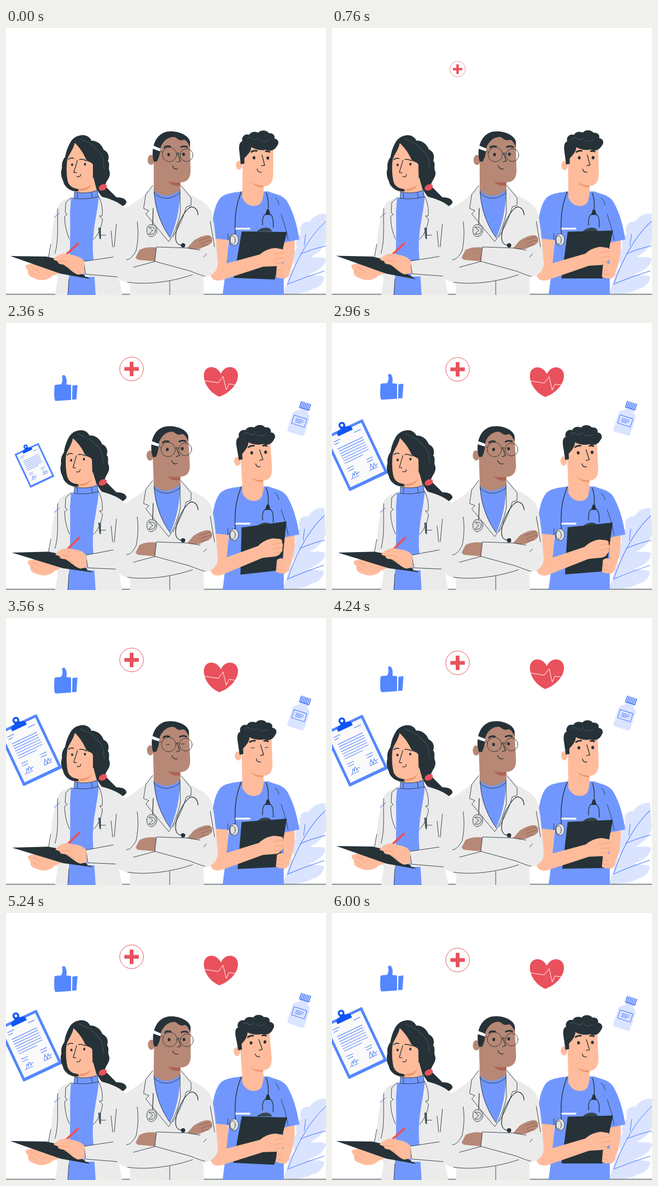
These frames come from a looping animation (600 px wide and 500 px high, 6040 ms). An HTML page:

```html
<!DOCTYPE html>
<html lang="en">
<head>
<meta charset="utf-8">
<title>Medical team</title>
<style>
html, body { margin: 0; width: 100%; height: 100%; overflow: hidden; background: #fff; }
svg { display: block; width: 600px; height: 500px; }
.ink { fill: #263238; }
.line { fill: none; stroke: #263238; stroke-width: .9; stroke-linejoin: round; stroke-linecap: round; }
.bold { stroke-width: 1.6; }
.brow { stroke-width: 3; }
.coat { fill: #ebebeb; }
.scrub { fill: #7197ff; }
.skin { fill: #ffbc9c; }
.brown { fill: #b78876; }
.red { fill: #e9515c; }
.blue { fill: #5387ff; }
.pale { fill: #dbe4ff; }
.thin { fill: none; stroke: #3f73ff; stroke-width: 1; }
.shade { fill: #ee9871; }
</style>
</head>
<body>
<svg viewBox="0 0 600 500">
  <path class="line" style="stroke-width:1.2" d="M0 498.500H600"/>

  <g id="leaf">
    <path class="pale" d="M600 348C584 346 574 355 569 363C554 361 549 374 553 386C545 390 542 402 545 412C537 420 538 440 541 447C529 456 530 470 526 478L520 497C540 499 560 498 574 489C586 487 596 478 597 466C585 462 571 463 567 461C583 456 598 447 600 433C592 426 578 432 572 428C586 422 598 410 602 395Z"/>
    <path class="thin" d="M528 481C542 440 567 391 600 362M552 423Q576 413 600 408M530 479Q562 466 597 455M559 408L562 386"/>
  </g>

  <g id="clip">
    <g transform="translate(45 247.500) rotate(-25.300)">
      <rect class="blue" x="-40" y="-56" width="80" height="112" rx="2"/>
      <rect x="-35" y="-51" width="70" height="101" fill="#fafafa"/>
      <path fill="#0f55f5" d="M-15-46V-52Q-12-56-6-56L-4-60H4L6-56Q12-56 15-52V-46Z"/>
      <circle cy="-62" r="4.500" fill="#fff" stroke="#0f55f5" stroke-width="3.600"/>
      <path class="thin" id="notes"/>
    </g>
  </g>

  <g id="cross">
    <circle r="22.200" fill="#fff" stroke="#e9515c"/>
    <path class="red" d="M-3.500-13.500H3.500V-3.500H13.500V3.500H3.500V13.500H-3.500V3.500H-13.500V-3.500H-3.500Z"/>
  </g>

  <g id="heart">
    <path class="red" d="M-3 28C-18 22-32 6-32-12C-32-30-10-34 0-15C7-32 28-31 31.500-16C35 2 17 21-3 28Z"/>
    <path fill="none" stroke="#fff" stroke-width="1" d="M-31-2L-5 2L4-10L10 15L15 4L30 6"/>
  </g>

  <g id="thumb" class="blue">
    <path d="M-21-5Q-20-7-9-7C-5-12-6-18-7-23Q-2-27 0-21Q3-14 1-7L10-6V22Q-5 23-19 24Q-23 22-21-5Z"/>
    <path d="M12.500-5L22-6L20 21L12 21.500Z"/>
  </g>

  <g id="bottle">
    <g transform="rotate(18)">
      <path class="pale" d="M-6-20H10V-14Q17-12 17-4V26Q17 30 13 30H-12Q-16 30-16 26V-5Q-15-12-6-14Z"/>
      <path fill="none" stroke="#2f66ff" stroke-width="1.600" d="M-7-32V-21M-4-32V-21M-1-32V-21M2-32V-21M5-32V-21M8-32V-21M11-32V-21M-8-20H12"/>
      <path class="thin" d="M-12-3H13V13H-12ZM-7 2H8M-7 5H8M-7 8H4"/>
    </g>
  </g>

  <!-- woman -->
  <path class="ink" d="M171 303C178 316 186 325 200 329Q205 333 208 334Q220 337 226 327Q225 317 207 317Q196 306 186 296Z"/>
  <path class="coat" d="M122 317C108 322 100 326 97 336C88 360 85 390 84 412L79 432L90 452L97 468L92 500H218L204 430L230 400V345C215 325 195 320 173 314Z"/>
  <path class="scrub" d="M122 318L174 315C172 345 161 380 163 420L168 500H116C120 450 121 380 120 345Z"/>
  <path class="skin" d="M134 290L168 286L170 308Q150 316 131 309Z"/>
  <path class="scrub" d="M129 307Q150 312 171 304L173 316Q150 322 128 319Z"/>
  <path class="line" d="M129 307Q150 312 171 304L173 316Q150 322 128 319ZM134 309V318M160 308L162 318M122 318L112 327L111 346L115 349L110 353C110 370 114 384 119 395M173 315C180 325 182 344 180 352L175 352L181 358C179 376 171 389 164 396M97 338C96 375 99 395 92 422M84 405L79 432M200 410L197 380M116 500L118 470"/>
  <path class="thin" d="M90 355L101 346"/>
  <path fill="#455a64" d="M173 374H178V396L175 394Z"/>
  <path class="line" d="M176 388H187"/>

  <g id="womanHead">
    <path class="ink" d="M140 201C150 199 158 205 160 211C172 211 180 219 183 228C190 231 195 239 191 249C196 255 191 262 194 268C197 278 190 284 187 291C184 300 176 305 168 303L130 306C116 304 108 294 107 286C102 276 103 268 105 262C104 255 106 247 111 241C113 230 116 222 122 212C127 205 133 202 140 201Z"/>
    <path class="skin" d="M135 293L164 280L170 303Q152 309 136 305Z"/>
    <path class="shade" d="M130 299Q150 304 160 293Q157 304 141 305Z"/>
    <path class="skin" d="M129 215C126 228 118 236 115 246C113 258 113 276 116 288C119 297 128 302 140 301C154 300 162 290 163 278V256C160 250 154 252 150 246C146 236 140 226 129 215Z"/>
    <path fill="none" stroke="#455a64" d="M139 207C147 213 158 214 164 221C169 229 177 231 180 240C185 247 181 255 185 264"/>
    <path class="line bold" d="M117 246Q121 242 127 244M138 246Q145 245 151 249"/>
    <path class="line" style="stroke-width:1.300" d="M134 248L127 270L132 271M133 278Q140 280 140 274"/>
    <ellipse class="ink" cx="124" cy="256" rx="2" ry="2.500"/>
    <ellipse class="ink" cx="148" cy="255" rx="2" ry="2.500"/>
  </g>
  <ellipse class="red" cx="181.500" cy="298.500" rx="8" ry="5.500" transform="rotate(-25 181.500 298.500)"/>

  <g id="tablet">
    <path class="skin" d="M37 444C36 450 40 452 42 455C39 461 45 467 52 468C60 474 78 474 87 464L98 460L97 448L60 438Z"/>
    <path class="line" style="stroke:#eb996e" d="M42 455Q50 457 54 463M47 447Q58 452 61 458"/>
    <path class="ink" d="M8 427L76 428L97 433L158 470L102 460Z"/>
  </g>
  <g id="womanArm">
    <path class="coat" d="M146 437L205 428L214 466H148Z"/>
    <path class="line" d="M204 428.500L146 437L149 461L214 466.500"/>
    <path stroke="#e9515c" stroke-width="4" stroke-linecap="round" d="M135 404L113 424"/>
    <path class="skin" d="M89 434C95 425 107 420 118 424Q133 426 141 431L147 437V460L135 462C125 459 118 449 107 443Q96 442 97 437Z"/>
    <path class="line" style="stroke:#eb996e" d="M97 437Q108 434 117 439M108 443Q119 446 124 453"/>
  </g>

  <!-- nurse -->
  <path class="skin" d="M392 390H417L416 450L400 472C385 472 380 463 384 450Z"/>
  <path class="skin" d="M519 398L541 395C543 420 538 445 531 458C530 467 524 471 515 470L506 467L507 445L519 438Z"/>
  <path class="scrub" d="M443 306C428 308 412 309 402 318C392 330 388 350 386 372L388 394L418 397C414 440 410 470 406 500H521L520 402L550 396C545 365 538 345 530 330C522 312 505 312 492 306Z"/>
  <path class="skin" d="M443 303V318C450 332 460 334 467 333C477 332 482 327 483 305Z"/>
  <path class="line" d="M416 397L416 385M505 318Q511 324 512 331M516 349C520 362 525 375 529 397M520 402L524 382"/>
  <path class="line" style="stroke-width:1.400" d="M441 307C432 330 428 350 430 386M488 309C493 322 492 335 491 347M481 369C480 351 485 348 491 348C498 348 502 353 501 373"/>
  <path class="ink" d="M489 340H493L496 350H486Z"/>
  <ellipse cx="427.500" cy="396.500" rx="8.500" ry="11" fill="#e0e0e0" stroke="#263238" stroke-width=".9"/>
  <ellipse class="line" cx="425" cy="397" rx="5" ry="8"/>
  <rect x="430" y="374" width="28" height="3.500" fill="#fff"/>
  <path fill="#37474f" d="M470 381Q476 375 484 374Q495 372 499 381Z"/>

  <g id="nurseHead">
    <ellipse class="skin" cx="437" cy="257" rx="6" ry="8.500"/>
    <path class="skin" d="M444 240L443 312Q462 326 483 312V296C495 297 501 288 501 272V215H455Z"/>
    <path class="shade" d="M460 288Q468 295 483 295.500V299Q467 299 460 288Z"/>
    <path class="ink" d="M440 255L438 235C436 222 437 214 443 212C441 204 448 197 456 200C460 193 468 194 473 196C478 190 489 191 493 197C502 196 505 203 503 207C511 208 513 216 508 221C504 229 495 232 487 228C477 230 467 227 460 223C459 233 452 238 447 244V254Z"/>
    <path fill="none" stroke="#455a64" d="M452 208Q456 202 462 207Q468 212 475 206M477 210Q486 215 494 209"/>
    <path class="line brow" d="M460 232Q464 229 470 230M487 231Q491 230 494 232"/>
    <path class="line" style="stroke-width:1.400" d="M480 238L485 257L479 258M471 264Q472 271 479 270"/>
    <ellipse class="ink eye" cx="465" cy="243" rx="2.500" ry="3"/>
    <ellipse class="ink eye" cx="491" cy="243.500" rx="2.500" ry="3"/>
  </g>
  <path id="folder" class="ink" d="M442 381L527 382L504 471L427 468Z"/>
  <g id="nurseArm">
    <path class="skin" d="M402 444L476 424C484 417 493 413 505 412L517 414Q523 416 521 421Q524 426 521 431Q522 437 517 440Q515 445 506 446L482 447L405 472C389 476 381 468 384 453Z"/>
    <path class="line" style="stroke:#eb996e" d="M521 421Q511 421 502 424M521 431Q511 430 504 433M517 440Q511 440 505 440"/>
  </g>
  <path class="skin" d="M508 444Q514 438 521 442L531 448V462Q524 470 515 469L506 466Z"/>
  <path class="line" style="stroke:#eb996e" d="M509 453Q514 452 518 455M508 461Q513 460 517 463"/>

  <!-- doctor -->
  <path class="coat" d="M275 295C255 322 230 334 216 342C208 350 206 380 203 410C200 430 201 450 206 462C212 472 222 476 233 478L232 500H371L370 466C385 467 398 455 397 440C394 400 391 360 384 342C378 328 360 320 345 312L328 295Z"/>
  <path class="scrub" d="M277 298C277 335 290 370 308 393C320 365 326 340 327 296Z"/>
  <path class="brown" d="M277 285V305Q300 327 327 303V285Z"/>
  <path class="scrub" d="M277 302Q300 322 327 300V309Q302 330 277 309Z"/>
  <path class="line" d="M277 309Q300 329 326 309M275 295L262 312L258 338L268 342L262 348L305 400C312 392 323 367 327 345L326 297M328 295L347 318V332L338 335C334 350 325 372 313 391M307 474V500M278 305C279 345 296 377 308 393"/>
  <path class="line" d="M246 363C249 385 247 402 244 417C238 428 232 434 226 434M207 367L203 410M239 448L280 437M228 476C260 481 305 477 350 462M383 362L391 410M376 423Q369 432 362 434"/>
  <path class="brown" d="M282 411Q262 409 250 416L243 430L247 434L280 437Z"/>
  <path class="brown" d="M338 414L352 398Q366 389 377 388Q384 388 384 391Q388 393 386 397Q389 401 380 406L362 414Z"/>
  <path fill="none" stroke="#8f5f50" d="M384 391Q373 394 362 398M386 397Q374 399 365 404M380 406Q372 407 366 409"/>
  <path class="coat" d="M282 410L340 412L366 418L384 463L345 455L279 437Z"/>
  <path class="line" d="M364 416L340 412L282 410L279 437L345 455Q362 462 373 465"/>
  <path class="line" style="stroke-width:1.300" d="M347 335C334 341 318 372 318 392C318 403 324 407 331 407M344 336C354 332 360 342 360 350M275 368L276 338"/>
  <circle class="ink" cx="332" cy="407" r="4"/>
  <path d="M272 368Q282 369 283 379Q282 389 272 391Q264 389 264 379Q264 369 272 368Z" fill="#e0e0e0" stroke="#263238" stroke-width=".9"/>
  <path class="line" d="M268 373Q281 372 280 380Q278 388 268 386M275 379L268 373M275 379L268 386"/>

  <g id="doctorHead">
    <ellipse class="brown" cx="272" cy="247" rx="6.500" ry="9.500"/>
    <path class="brown" d="M277 230V304Q300 325 327 303V289C340 289 346 281 346 268L345 212Q320 196 285 208Z"/>
    <path fill="#ae6255" d="M304 287Q313 290 327 289V295Q312 298 304 287Z"/>
    <path class="ink" d="M277 250C271 228 278 199 302 194C322 191 343 201 345 213V223C341 214 338 210 334 209C324 213 322 206 316 204C303 203 294 213 290 223C289 237 286 244 283 250Z"/>
    <path fill="#fff" d="M276 220L290 226L289 231L275 226Z"/>
    <path class="line brow" d="M297 224Q300 220 308 222M328 223Q334 220 340 223"/>
    <path class="line" style="stroke-width:1.300" d="M322 234L327 249L321 251M312 258Q315 266 322 264"/>
    <path class="line" d="M289 229L293 233M320 236Q323 232 327 236"/>
    <circle class="line" cx="306.500" cy="237" r="13.500"/>
    <circle class="line" cx="338.500" cy="238" r="12"/>
    <ellipse class="ink eye" cx="305" cy="237" rx="2.700" ry="3.200"/>
    <ellipse class="ink eye" cx="333" cy="236.500" rx="2.700" ry="3.200"/>
  </g>
</svg>
<script>
const LOOP = 6040;
const MARKS = [0, 1480, 2360, 3560, 4240, 5240, 6000];
const get = id => document.getElementById(id);

// Eased value through a series of poses
function pose(t, values, marks = MARKS) {
  let i = 0;
  while (i < marks.length - 2 && t > marks[i + 1]) i++;
  const k = Math.min(1, Math.max(0, (t - marks[i]) / (marks[i + 1] - marks[i])));
  return values[i] + (values[i + 1] - values[i]) * (1 - Math.cos(k * Math.PI)) / 2;
}

// Rotating parts: pivot x, pivot y, angles
const turns = {
  womanHead: [147, 306, [0, -2.2, -2.2, 0, -1.4, -1.5, -1.3]],
  tablet: [83, 350, [0, .6, -2.3, -2.4, 0, 0, 0]],
  womanArm: [90, 350, [0, -1.2, -2.3, -2.4, 0, -.2, -.2]],
  doctorHead: [302, 298, [0, -.4, -2.3, -1.4, -1.9, .7, -1.6]],
  nurseHead: [465, 306, [0, -2.5, -3.8, -2.3, -1.9, -5, -2.5]],
  folder: [455, 384, [0, -4.2, -8.4, -4.9, -3.2, .7, -2.2]],
  nurseArm: [395, 461, [0, -2.2, -4.6, -2.2, 0, .5, -1.2]],
  leaf: [526, 498, [0, -.5, -1.2, -.6, -1.4, 0, 0]]
};

// Floating icons: start of growth, x, heights, optional own marks
const icons = {
  cross: [300, 235.5, [77, 78, 81, 86, 88, 85, 78.5, 84, 86, 81.5, 82, 88],
    [900, 1480, 1950, 2360, 2760, 3200, 3560, 4240, 4700, 5150, 5240, 6000]],
  heart: [970, 403, [109, 109, 110, 111, 105, 107.5, 114]],
  thumb: [1350, 112, [122, 122, 122, 117.5, 115, 124, 123]],
  bottle: [1600, 551, [179, 179, 179, 178, 178, 182, 188]]
};

const grow = (t, start) => Math.min(1, Math.max(0, (t - start) / 700));

function buildNotes() {
  let d = 'M-28-40h14M15-40h14M-28-35h9';
  for (let y = -25; y <= 5; y += 5) d += `M-26 ${y}h${y === 5 ? 38 : 52}`;
  for (const x of [-26, 13]) d += `M${x} 16h14m-14 5h12m-14 16h17`;
  d += 'M-24 36q6-14 5-2q6-14 5 0q4-6 6-2M13 35l5-8l1 9l5-8l1 6l5-3';
  get('notes').setAttribute('d', d);
}

function draw(t) {
  for (const [id, [x, y, angles]] of Object.entries(turns))
    get(id).setAttribute('transform', `rotate(${pose(t, angles)} ${x} ${y})`);

  for (const [id, [start, x, heights, marks]] of Object.entries(icons))
    get(id).setAttribute('transform',
      `translate(${x} ${pose(t, heights, marks)}) scale(${grow(t, start)})`);

  const drift = pose(t, [0, 0, 0, 0, 1, 1, -4]);
  get('clip').setAttribute('transform',
    `translate(${Math.min(0, drift) * .35} ${drift}) translate(67 298) scale(${grow(t, 1925)}) translate(-67 -298)`);

  const open = Math.min(1, Math.abs(t - 3560) / 130);
  for (const eye of document.querySelectorAll('.eye')) {
    eye.setAttribute('ry', .6 + 2.5 * open);
    eye.setAttribute('rx', 4 - 1.4 * open);
  }
}

buildNotes();
const begin = performance.now();
function tick() {
  draw((performance.now() - begin) % LOOP);
  requestAnimationFrame(tick);
}
tick();
</script>
</body>
</html>
```
